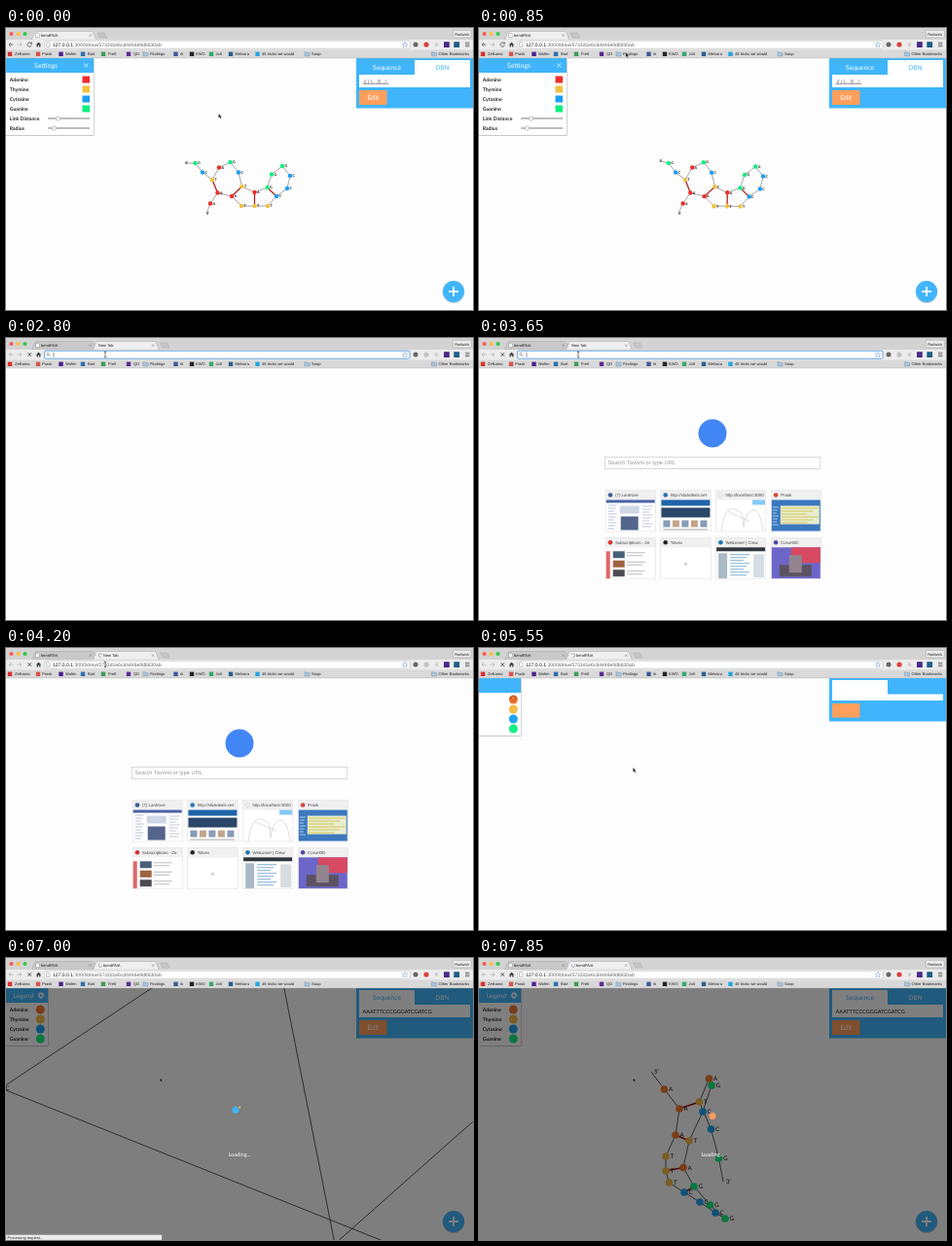
Animation of 480x290 px, one loop 8000 ms. Source, as an HTML page:

```html
<!DOCTYPE html>
<html lang="en">
<head>
<meta charset="utf-8">
<title>bendRNA</title>
<style>
html, body { margin: 0; width: 100%; height: 100%; overflow: hidden; background: #fdfdfd; }
svg { position: absolute; left: 0; top: 0; width: 480px; height: 290px; }
text { text-rendering: geometricPrecision; white-space: pre; }
.ui { font-family: "Liberation Sans", Arial, sans-serif; }
.web { font-family: Lato, "Open Sans", sans-serif; }
</style>
</head>
<body>
<svg viewBox="0 0 480 290"></svg>
<script>
const LOOP = 8000, STEP = 50;
const BLUE = '#40b5fb', ORANGE = '#ff9f5c';
const svg = document.querySelector('svg');
const layers = [];

function el(tag, attrs, parent = svg) {
  const node = document.createElementNS('http://www.w3.org/2000/svg', tag);
  set(node, attrs);
  return parent.appendChild(node);
}
function set(node, attrs) {
  for (const key in attrs) node.setAttribute(key, attrs[key]);
}
const rect = (p, x, y, width, height, fill, more) => el('rect', { x, y, width, height, fill, ...more }, p);
const circle = (p, cx, cy, r, fill, more) => el('circle', { cx, cy, r, fill, ...more }, p);
const stroke = (p, d, color, width = 0.6, more) =>
  el('path', { d, fill: 'none', stroke: color, 'stroke-width': width, ...more }, p);
function text(p, x, y, size, str, fill = '#222', more) {
  const node = el('text', { x, y, 'font-size': size, fill, class: 'ui', ...more }, p);
  node.textContent = str;
  return node;
}
const web = (p, x, y, size, str, fill, more) => text(p, x, y, size, str, fill, { class: 'web', ...more });
const mid = { 'text-anchor': 'middle' };

// A group that is visible only during [from, to)
function layer(from, to = LOOP, parent = svg) {
  const g = el('g', {}, parent);
  layers.push({ g, from, to });
  return g;
}
const clamp = v => Math.min(1, Math.max(0, v));
const mix = (a, b, k) => a + (b - a) * k;

// ---- molecule ----
const SEQ = 'AAATTTCCCGGGATCGATCG';
const PAIRS = [[2, 18], [3, 14], [5, 13], [7, 12]];
const FLAT = [[206, 191], [210, 180.5], [217.5, 169.5], [232, 173], [242, 183], [255.5, 183],
  [269, 183], [278, 173], [289, 165], [292, 152], [284, 142], [273, 150.5], [268.5, 164],
  [255.5, 169], [242.5, 163], [239, 148.5], [230.5, 138], [219, 143.5], [212, 156],
  [202, 148.5], [194.5, 139], [184, 139]];
const FOLDED = [[177, 117], [190.5, 135], [206, 155], [202, 182], [192, 204], [192, 219],
  [195.5, 231], [211, 241], [227, 251], [243, 262], [253, 268], [237.5, 254], [221, 235],
  [210, 215.5], [216, 188], [230, 158], [239, 131], [236.5, 124], [226.5, 148],
  [238.5, 176], [246.5, 206], [251, 230]];
const CORNERS = { 8: [-5, 134], 9: [640, 392], 10: [700, -27], 11: [338, 294] };
const scattered = i => CORNERS[i] || (i < 8 ? [450 + 20 * (7 - i), -169] : [246 - 10 * (i - 12), -170]);

function molecule(parent, o) {
  const chain = stroke(parent, '', o.line, o.width);
  const bonds = PAIRS.map(() => stroke(parent, '', o.bond, o.width * 2));
  const nodes = [...SEQ].map(c => circle(parent, 0, 0, o.r, o.colors[c]));
  const labels = ["5'", ...SEQ, "3'"].map(c => web(parent, 0, 0, o.size, c, '#111', { 'font-weight': o.weight }));
  return pts => {
    set(chain, { d: 'M' + pts.join('L') });
    PAIRS.forEach(([a, b], i) => set(bonds[i], { d: `M${pts[a]}L${pts[b]}` }));
    nodes.forEach((n, i) => set(n, { cx: pts[i + 1][0], cy: pts[i + 1][1] }));
    labels.forEach((n, i) => {
      const dx = i % 21 ? o.dx : o.endDx;
      set(n, { x: pts[i][0] + dx, y: pts[i][1] + o.size * 0.36 });
    });
  };
}

// ---- first page ----
rect(svg, 0, 0, 480, 290, '#fdfdfd');
const SHARP = { A: '#ee2e2a', T: '#f0c243', C: '#1b9ff5', G: '#0df07f' };
const SOFT = { A: '#f27a31', T: '#f5bc48', C: '#1fa4f2', G: '#14ee82' };
const BASES = ['Adenine', 'Thymine', 'Cytosine', 'Guanine'];
const bold = { 'font-weight': 700 };

function leftPanel(p, w, h) {
  rect(p, 0, 31.4, w + 0.8, h + 0.6, '#c9c9c9', { rx: 1 });
  rect(p, 0, 31, w, h, '#fff');
  rect(p, 0, 31, w, 15, BLUE);
}
function fab(p) {
  circle(p, 460, 271.6, 11.4, '#ccd3d8');
  circle(p, 460, 271, 11, BLUE);
  stroke(p, 'M455 271h10M460 266v10', '#fff', 1.9);
}
function rightPanel(p, left, value, more) {
  rect(p, 360, 31, 120, 51.5, BLUE);
  rect(p, left ? 363 : 420, 33, 57, 16, '#fff');
  rect(p, 363, 48, 114, 13, '#fff');
  web(p, 391.5, 43, 6.8, 'Sequence', left ? BLUE : '#fff', mid);
  web(p, 448.5, 43, 6.6, 'DBN', left ? '#fff' : BLUE, mid);
  web(p, 366.5, 56.5, 5.5, value, '#222', more);
  rect(p, 363, 64, 28.5, 15, ORANGE);
  web(p, 377.3, 74, 7.2, 'Edit', '#fff', mid);
}

const first = layer(0, 2250);
leftPanel(first, 90, 79);
web(first, 41, 41, 6.8, 'Settings', '#fff', mid);
stroke(first, 'M80.3 36.5l4 4m0-4l-4 4', '#fff', 0.7);
BASES.forEach((name, i) => {
  web(first, 3.8, 55 + 10 * i, 5.1, name, '#222', bold);
  rect(first, 78.5, 49.5 + 10 * i, 7.5, 7, SHARP[name[0]]);
});
[['Link Distance', 53.5], ['Radius', 49.5]].forEach(([name, x], i) => {
  const y = 93 + 10 * i;
  web(first, 3.8, y + 2, 5.1, name, '#222', bold);
  stroke(first, `M43 ${y}H86`, '#a8a8a8', 1.3);
  circle(first, x, y, 2.2, '#f4f4f4', { stroke: '#999', 'stroke-width': 0.5 });
});
rightPanel(first, false, '.((.(.(....)))...)..', { fill: '#666', 'font-style': 'italic', 'text-decoration': 'underline' });
fab(first);
const drawFlat = molecule(first, {
  line: '#777', width: 0.65, bond: '#b3201c', r: 2.2, size: 3.7, weight: 700, dx: 2.4, endDx: 0, colors: SHARP
});

// ---- new tab page ----
const start = layer(3200, 5000);
circle(start, 240, 98, 14.5, '#4285f4');
rect(start, 129.3, 122.3, 221.5, 12, '#fff', { stroke: '#c4c4c4', 'stroke-width': 0.6 });
text(start, 132.5, 130.4, 5.7, 'Search Tavomi or type URL', '#999');

const TILES = [
  ['(7) Lantrove', '#3b5998'], ['http://slickdeals.net', '#2373b8'],
  ['http://localhost:3000', '#eee'], ['Prask', '#db4437'],
  ['Subscriptions - Ze', '#d9302a'], ['Tolvex', '#222'],
  ['Welcome! | Crew', '#1578b3'], ['Corvel3D', '#4b46a8']];
const bars = (p, x, y, n, w, gap, color) => {
  for (let k = 0; k < n; k++) rect(p, x, y + k * gap, w - (k % 3) * w * 0.15, 1, color);
};
const THUMBS = [
  (p, x, y) => { rect(p, x, y, 50, 3, '#4862a3'); bars(p, x + 2, y + 5, 9, 9, 3, '#b9c2d8');
    rect(p, x + 14, y + 6, 20, 8, '#cfd6e6'); rect(p, x + 15, y + 17, 18, 14, '#53658c'); bars(p, x + 37, y + 6, 8, 11, 3, '#c4cad8'); },
  (p, x, y) => { rect(p, x, y, 50, 6, '#1c64a8'); rect(p, x, y + 8, 50, 10, '#2a4668');
    for (let k = 0; k < 5; k++) rect(p, x + 2 + k * 9.5, y + 21, 7, 7, ['#879cb5', '#c3a48a'][k % 2]); bars(p, x + 2, y + 30, 1, 46, 2, '#aaa'); },
  (p, x, y) => { rect(p, x + 37, y, 13, 5, '#82caf4');
    stroke(p, `M${x + 5} ${y + 32}c3-22 8-24 15-22s7 8 8 18c2-20 14-24 18-6l2 10M${x + 12} ${y + 12}l22 10`, '#bbb', 0.5); },
  (p, x, y) => { rect(p, x, y, 50, 32, '#3b78bd'); rect(p, x + 9, y + 6, 40, 19, '#e8edcf');
    bars(p, x + 10, y + 8, 6, 38, 3, '#d8c85c'); bars(p, x + 1, y + 7, 7, 6, 3, '#a9caec'); },
  (p, x, y) => { rect(p, x, y + 4, 4, 28, '#d66');
    for (let k = 0; k < 3; k++) { rect(p, x + 7, y + 4 + k * 9.5, 12, 7, ['#486077', '#a0633f', '#4c4a52'][k]); bars(p, x + 21, y + 5 + k * 9.5, 2, 19, 3, '#bbb'); } },
  (p, x, y) => circle(p, x + 25, y + 17, 1.8, '#d5d5d5'),
  (p, x, y) => { rect(p, x, y, 50, 4, '#30363c'); rect(p, x + 2, y + 6, 9, 26, '#a9bac6');
    bars(p, x + 14, y + 7, 8, 20, 3, '#7bacd0'); rect(p, x + 38, y + 7, 11, 24, '#d5dde2'); },
  (p, x, y) => { rect(p, x, y, 50, 32, '#6b66c8'); rect(p, x + 20, y, 30, 16, '#d84a62');
    rect(p, x + 8, y + 18, 33, 12, '#5c5362'); rect(p, x + 18, y + 8, 13, 18, '#92848e'); }
];
TILES.forEach(([name, color], i) => {
  const x = 130 + 56.7 * (i % 4), y = i < 4 ? 156.5 : 205.3;
  rect(start, x, y, 51.5, 42.5, '#f0f0f0', { stroke: '#ddd', 'stroke-width': 0.4 });
  rect(start, x + 0.5, y + 10, 50.5, 32, '#fff');
  circle(start, x + 5, y + 5, 2.3, color, { stroke: '#aaa', 'stroke-width': 0.2 });
  text(start, x + 10, y + 6.6, 4.4, name, '#444');
  THUMBS[i](start, x + 0.7, y + 10);
});

// ---- second page ----
const swatches = (p, marked) => BASES.forEach((name, i) => {
  circle(p, 35.3, 53 + 10 * i, 4.5, SOFT[name[0]]);
  if (marked && !i) stroke(p, 'M33.5 50.8v1.8m3.6-1.8v1.8M33 55.5c1-2 3.6-2 4.6 0M31.5 53a3.8 3.8 0 0 1 7.6 0', '#a83a1c', 0.7);
});
const bare = layer(5550, 5750);
leftPanel(bare, 43, 59);
swatches(bare, true);
rect(bare, 360, 31, 120, 44.5, BLUE);
rect(bare, 363, 33, 57, 15, '#fff');
rect(bare, 363, 47.5, 114, 6.5, '#fff');
rect(bare, 363, 57, 28.5, 14.5, ORANGE);

const second = layer(5750);
leftPanel(second, 43, 59);
web(second, 18, 41, 6.5, 'Legend', '#fff', mid);
circle(second, 36, 38.5, 2, 'none', { stroke: '#fff', 'stroke-width': 1.3 });
circle(second, 36, 38.5, 3, 'none', { stroke: '#fff', 'stroke-width': 1, 'stroke-dasharray': '1.18 1.18' });
BASES.forEach((name, i) => web(second, 3.8, 55 + 10 * i, 5.1, name, '#222', bold));
swatches(second);
rightPanel(second, true, SEQ);
fab(second);
const drawFolded = molecule(layer(7000), {
  line: '#333', width: 0.8, bond: '#a01414', r: 3.8, size: 6.2, weight: 400, dx: 4.6, endDx: 3, colors: SOFT
});

const shade = layer(5950);
rect(shade, 0, 31, 480, 259, '#000', { opacity: 0.5 });
web(shade, 240, 203.5, 5.6, 'Loading...', '#fff', mid);
const bigDot = circle(shade, 0, 0, 3.5, BLUE);
const smallDot = circle(shade, 0, 0, 1, '#f5bc48');
const status = layer(6150, 7400);
rect(status, 0, 284.8, 160, 5.2, '#ececec', { stroke: '#bbb', 'stroke-width': 0.3 });
text(status, 1.5, 289, 3.9, 'Processing request...');

// ---- browser frame ----
const bar = el('g', {});
rect(bar, 0, 0, 480, 12, '#d3d3d3');
['#fc5b57', '#fdbc40', '#34c84a'].forEach((c, i) => circle(bar, 5.5 + 7 * i, 6, 2.1, c));
rect(bar, 459.3, 2.3, 19, 7.6, '#ececec', { rx: 1.2, stroke: '#999', 'stroke-width': 0.5 });
text(bar, 468.8, 7.6, 4, 'Rodwick', '#222', mid);

function tab(p, x, w, fill) {
  el('path', { d: `M${x} 12.2l3-7.4q.6-1.3 1.8-1.3H${x + w - 5}q1.2 0 1.8 1.3l3 7.4z`, fill, stroke: '#a5a5a5', 'stroke-width': 0.5 }, p);
  stroke(p, `M${x + w - 7.5} 6.4l2.4 2.4m0-2.4l-2.4 2.4`, '#777', 0.5);
}
const plusTab = (p, x) => el('path', { d: `M${x} 5h7l2.6 5h-7z`, fill: '#c6c6c6', stroke: '#a5a5a5', 'stroke-width': 0.4 }, p);
const page = (p, x, y) => el('path', { d: `M${x} ${y}h2.2l1.3 1.3v3.2h-3.5z`, fill: '#fff', stroke: '#777', 'stroke-width': 0.45 }, p);
function firstTab(p, fill) {
  tab(p, 26.5, 66.5, fill);
  page(p, 30.7, 5.2);
  text(p, 36, 9, 4, 'bendRNA');
}
const oneTab = layer(0, 2250), twoTabs = layer(2250);
firstTab(oneTab, '#efefef');
plusTab(oneTab, 94);
firstTab(twoTabs, '#c9c9c9');
tab(twoTabs, 89.5, 68, '#efefef');
plusTab(twoTabs, 158.5);
text(layer(2250, 4200), 95, 9, 4, 'New Tab');
text(layer(4200, 5350), 100, 9, 4, 'New Tab');
text(layer(5350), 100, 9, 4, 'bendRNA');
const spinner = stroke(layer(4200), 'M1.8 0a1.8 1.8 0 1 1-1.8-1.8', '#7d8fa8', 0.6);

const tools = el('g', {});
rect(tools, 0, 12, 480, 11, '#ececec');
rect(tools, 0, 22.5, 480, 8.2, '#d9d9d9');
stroke(tools, 'M0 30.8H480', '#a9a9a9', 0.5);
function arrows(p, color) {
  stroke(p, 'M7.5 17H3M5 15l-2 2 2 2', color, 0.8);
}
arrows(layer(0, 2250), '#555');
arrows(layer(2250), '#b5b5b5');
stroke(tools, 'M11.5 17h4.5M14 15l2 2-2 2', '#b5b5b5', 0.8);
const reload = layer(0, 2250);
stroke(reload, 'M26 15.8a2.2 2.2 0 1 0 .3 1.8M26.4 14.4v1.8h-1.8', '#555', 0.8);
stroke(layer(2250), 'M22.6 15.2l3.4 3.6m0-3.6l-3.4 3.6', '#444', 0.9);
el('path', { d: 'M30.8 17.2l2.7-2.6 2.7 2.6h-.8v2.2h-1.3v-1.6h-1.2v1.6h-1.3v-2.2z', fill: '#444' }, tools);
rect(tools, 39.5, 13.2, 375.5, 8, '#fff', { rx: 1.3, stroke: '#b0b0b0', 'stroke-width': 0.5 });
const ring = { rx: 1.3, stroke: '#6da8e8', 'stroke-width': 1 };
rect(layer(1200, 2250), 39.5, 13.2, 375.5, 8, '#fff', ring);
rect(layer(2250, 4200), 39.5, 13.2, 375.5, 8, '#fff', ring);
stroke(svg, 'M410 14.3l.8 1.9 2 .1-1.6 1.3.6 2-1.8-1.1-1.8 1.1.6-2-1.6-1.3 2-.1z', '#6a94c8', 0.5);

rect(layer(1200, 2250), 48, 14, 112, 6.6, '#b3d5fb');
function address(p) {
  page(p, 41.6, 14.8);
  const node = text(p, 48, 18.9, 5.05, '127.0.0.1', '#111');
  const rest = el('tspan', { fill: '#666' }, node);
  rest.textContent = ':3000/draw/5733d1e6cd4446e9db830ab';
}
address(layer(0, 2250));
address(layer(3750));
const empty = layer(2250, 3750);
circle(empty, 43, 16.6, 1.3, 'none', { stroke: '#777', 'stroke-width': 0.6 });
stroke(empty, 'M44 17.6l1.6 1.6', '#777', 0.7);
stroke(empty, 'M49 14.7v5', '#222', 0.5);

circle(svg, 421, 17, 2.5, '#666');
const badge = (from, to, c) => circle(layer(from, to), 432, 17, 2.6, c);
badge(0, 2250, '#d8433b');
badge(2250, 5350, '#c2c2c2');
badge(5350, LOOP, '#d8433b');
circle(svg, 442.5, 17, 2, '#d0d0d0');
rect(svg, 450, 14.2, 5.8, 5.8, '#4a2a86');
rect(svg, 460.3, 14.2, 5.8, 5.8, '#1f5f86');
stroke(svg, 'M472 15.2h4.4M472 17h4.4M472 18.8h4.4', '#555', 0.8);

// Bookmarks: icon x, label x, label, icon colour (none = folder)
[[4, 9, 'Zelkomo', '#d9302a'], [33, 37, 'Prask', '#d8544a'], [56.5, 61, 'Wofen', '#4b1f8c'],
  [79, 84, 'Bort', '#2e6fb0'], [100, 105, 'Frelt', '#3f9c55'], [126, 131, 'QD', '#5c2d91'],
  [143.5, 148, 'Findings'], [174.5, 179, 'rk', '#3b5998'], [191, 195, 'KWO', '#222'],
  [211, 215.5, 'Jolt', '#35a86a'], [231, 235.5, 'Melvora', '#2d5f8e'],
  [258.5, 263, '48 tricks we would', '#25a5e0'], [309.5, 314, 'Soup'], [440, 444.5, 'Other Bookmarks']
].forEach(([ix, x, label, color]) => {
  if (color) rect(svg, ix - 2.2, 24.6, 4.4, 4.4, color);
  else el('path', { d: `M${ix - 2.6} 24.8h2l.6.7h2.6v3.4h-5.2z`, fill: '#a8c4dc', stroke: '#6f8ba5', 'stroke-width': 0.4 }, svg);
  text(svg, x, 28.3, 4.05, label);
});

// ---- pointer ----
const PATH = [[0, 218.5, 88], [50, 218.5, 88], [1050, 143, 18], [1200, 143, 18], [1400, 140, 18],
  [1800, 140, 18], [2200, 98, 7], [2300, 98, 7], [2700, 102, 17], [4250, 102, 17], [5200, 158.3, 123], [LOOP, 158.3, 123]];
const arrow = el('path', { d: 'M0 0v4.6l1.1-.9.8 1.8.8-.4-.8-1.7h1.4z', fill: '#111', stroke: '#fff', 'stroke-width': 0.25 });
const beam = stroke(svg, 'M-1.2-2.8h2.4M-1.2 2.8h2.4M0-2.8v5.6', '#222', 0.6);
function pointerAt(t) {
  const i = PATH.findIndex(k => k[0] > t), a = PATH[i - 1], b = PATH[i];
  const u = (t - a[0]) / (b[0] - a[0]), k = u * u * (3 - 2 * u);
  return [mix(a[1], b[1], k), mix(a[2], b[2], k)];
}
const show = (node, on) => { node.style.visibility = on ? 'visible' : 'hidden'; };

function render(t) {
  layers.forEach(l => show(l.g, t >= l.from && t < l.to));

  // slow turn of the flat layout; the loose ends swing further
  const k = t < 50 ? 0 : Math.min(t, 2200) / 1800;
  drawFlat(FLAT.map(([x, y], i) => {
    const swing = i === 21 ? [2.5, -4.7] : i === 0 ? [-0.8, -1] : [0, 0];
    return [x + k * (swing[0] - (y - 156) * 0.035), y + k * (swing[1] + (x - 212) * 0.015)];
  }));

  const away = (1 - clamp((t - 7000) / 850)) ** 3;
  drawFolded(FOLDED.map(([x, y], i) => {
    const [sx, sy] = scattered(i);
    return [mix(x, sx, away), mix(y, sy, away)];
  }));

  // the page is busy before the layout starts, so its loader stalls
  const lt = t < 6350 ? t : t < 6650 ? 6350 : t < 7000 ? 6650 : t;
  const turn = (lt - 7000) / 1700 * 3, angle = 4.1 + turn * Math.PI * 2;
  const half = Math.floor(turn * 2 + 0.01) & 1;
  set(bigDot, { cx: 238 + 3.5 * Math.cos(angle), cy: 159.3 + 3.8 * Math.sin(angle), fill: half ? ORANGE : BLUE });
  set(smallDot, { cx: 238 - 3.8 * Math.cos(angle), cy: 159.3 + 7 * Math.sin(angle), r: half ? 0 : 1.1 });
  set(spinner, { transform: `translate(97 7.5) rotate(${lt * 0.36})` });

  const [x, y] = pointerAt(t), typing = y > 12 && y < 22 && x > 39;
  const transform = `translate(${x} ${y})`;
  set(arrow, { transform });
  set(beam, { transform });
  show(arrow, !typing);
  show(beam, typing);
}

const began = performance.now();
function tick() {
  const t = (performance.now() - began) % LOOP;
  render(Math.floor(t / STEP) * STEP);
  requestAnimationFrame(tick);
}
render(0);
requestAnimationFrame(tick);
</script>
</body>
</html>
```
